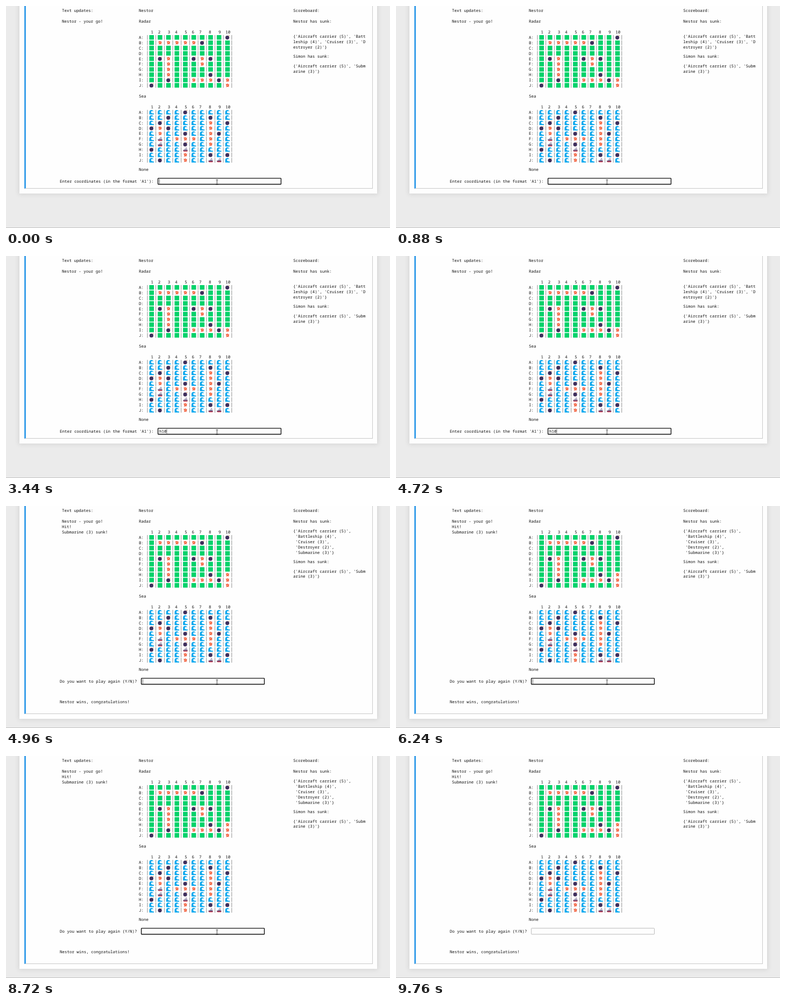
Animation, 714 px wide and 412 px high, one loop 9.84 s. Source, as an HTML page:

```html
<!DOCTYPE html>
<html lang="en">
<head>
<meta charset="utf-8">
<title>Battleships</title>
<style>
html, body { margin: 0; width: 100%; height: 100%; overflow: hidden; background: #ebebeb; }
#stage { position: relative; width: 714px; height: 412px; overflow: hidden; background: #ebebeb; }
#page, #cell { position: absolute; box-sizing: border-box; }
#page { left: 25px; top: -20px; width: 665px; height: 368px; background: #fefefe; box-shadow: 0 0 8px 1px rgba(87, 87, 87, .17); }
#cell { left: 34px; top: -20px; width: 648px; height: 359px; border: 1px solid #cacaca; border-left: 3px solid #3a9fea; }
svg { position: absolute; left: 0; top: 0; }
text { font: 7.483px "Noto Sans Mono", monospace; fill: #111; white-space: pre; text-rendering: geometricPrecision; }
</style>
</head>
<body>
<div id="stage">
  <div id="page"></div>
  <div id="cell"></div>
  <svg width="714" height="412" viewBox="0 0 714 412">
    <defs>
      <rect id="tile" x="-4.3" y="-4.2" width="8.6" height="8.4" rx=".5" fill="#00d26a"/>
      <path id="wave" fill="#0aa8ee" d="M4.3 4.2H-4.2V-.2C-4.2-2.8-2.4-4.2-.2-4.2C1.6-4.2 3-3.2 3.2-1.6C2-2.4 .1-2.5-.7-1.1C-1.6 .7 .2 2.9 4.3 2.2Z"/>
      <g id="bomb">
        <path d="M1.6-2Q2.4-3.5 3.1-3.2" fill="none" stroke="#9b6b4f" stroke-width=".7"/>
        <circle cx="-.3" cy=".4" r="3.6" fill="#3f2f5c"/>
        <circle cx="3.2" cy="-3.3" r=".7" fill="#f9a04a"/>
      </g>
      <g id="boom" transform="scale(.84)">
        <path fill="#f0401f" d="M-3.8-3.9L-1.2-2.4L.6-4.4L1.1-2.2L4.2-2.6L2.4-.4L4.2 1.2L2 1.6L2.6 4.2L.2 2.4L-2.6 4.3L-2-.1L-4.2-.4L-2.4-1.4Z"/>
        <path fill="#ffd3a3" d="M-1.2-1.3L.3-1.6L1.4-.5L.9 1L-.4 1.2L-1 .4Z"/>
      </g>
      <g id="ship">
        <path fill="#c5bdcf" d="M-2.6 .8V-.6H-1.2V-2.2H.6V-3.6H2.6V-2.2H3.6V.8Z"/>
        <path fill="#7d6f92" d="M-1.6-.2H3V.5H-1.6ZM1-3.6H2.4V-2.6H1Z"/>
        <path fill="#5b4470" d="M-4.3 .8H4.3L4 2.8H-3.6Z"/>
        <path fill="#d8475a" d="M-3.8 2.4H4.1L3.7 3.9H-3Z"/>
      </g>
    </defs>
    <rect y="411" width="714" height="1" fill="#c2c2c2"/>
    <g id="common"></g>
    <g id="turn"></g>
    <g id="won"></g>
    <rect id="box" x="282.6" y="319.6" width="228.8" height="11.2" rx=".8" fill="#fefefe" stroke="#111" stroke-width="1.4"/>
    <g id="typed"></g>
    <rect id="caret" x="285" y="321" width=".7" height="8.6" fill="#333"/>
    <path id="mouse" d="M390.3 322.4H391.6L392.3 323L393 322.4H394.3M392.3 323V331M390.3 331.6H391.6L392.3 331L393 331.6H394.3" fill="none" stroke="#222" stroke-width=".9"/>
  </svg>
</div>
<script>
const LOOP = 9840, WIN = 4840, BLUR = 8960, KEYS = [2720, 3040, 3280];
const CHAR = 4.49, BLINK = 530;
const $ = id => document.getElementById(id);

function add(parent, tag, attrs, text) {
  const el = document.createElementNS('http://www.w3.org/2000/svg', tag);
  for (const k in attrs) el.setAttribute(k, attrs[k]);
  if (text) el.textContent = text;
  return parent.appendChild(el);
}

// y is the middle of the first line
function write(parent, x, y, ...lines) {
  lines.forEach((s, i) => add(parent, 'text', { x, y: y + 2.7 + i * 9.9 }, s));
}

const ICONS = { '.': 'tile', '~': 'wave', o: 'bomb', x: 'boom', s: 'ship' };
const cellX = c => 270.7 + c * 15.68;

function icon(parent, kind, x, y) {
  add(parent, 'use', { href: '#' + ICONS[kind], x, y });
}

function board(top, rows) {
  const g = $('common');
  write(g, 247, top, '     1  2   3  4   5  6  7   8   9  10');
  rows.split(' ').forEach((row, r) => {
    const y = top + 9.9 * (r + 1);
    write(g, 247, y, 'ABCDEFGHIJ'[r] + ':');
    [...row].forEach((kind, c) => icon(g, kind, cellX(c), y));
    for (let c = 0; c <= 10; c++)
      add(g, 'rect', { x: cellX(c) - 8.1, y: y - 4.3, width: .8, height: 8.8, fill: '#777' });
  });
}

// Hard changes: steps is a list of [ms, value], the first at 0
function play(el, prop, steps) {
  const frames = steps.map(([ms, v]) => ({ offset: ms / LOOP, [prop]: v, easing: 'step-end' }));
  frames.push({ offset: 1, [prop]: steps[steps.length - 1][1] });
  el.animate(frames, { duration: LOOP, iterations: Infinity });
}

const common = $('common'), turn = $('turn'), won = $('won');

write(common, 104, 8.5, 'Text updates:');
write(common, 104, 28.3, 'Nestor - your go!');
write(common, 247, 8.5, 'Nestor');
write(common, 247, 28.3, 'Radar');
write(common, 247, 167.3, 'Sea');
write(common, 247, 303.7, 'None');
write(common, 534, 8.5, 'Scoreboard:');
write(common, 534, 28.3, 'Nestor has sunk:');

board(48.3, '.........o .xxxxxo... .......... .......... .ox..oxo.. ..x...x... ..x....... ..x....o.. ..o..xxxox o........x');
board(187.2, '~~~~o~~~~~ ~~o~~~~o~~ ~o~~~~~x~o oxo~~~~x~~ ~x~~o~~xo~ ~s~xxx~x~~ ~s~~o~~x~~ o~~~s~~~~~ ~~~~x~~o~o ~o~~x~~ss~');

const rival = ["{'Aircraft carrier (5)', 'Subm", "arine (3)'}"];
write(turn, 534, 56, "{'Aircraft carrier (5)', 'Batt", "leship (4)', 'Cruiser (3)', 'D", "estroyer (2)'}");
write(turn, 534, 93.3, 'Simon has sunk:');
write(turn, 534, 110.9, ...rival);
write(turn, 100, 325.3, "Enter coordinates (in the format 'A1'):");

write(won, 104, 38.2, 'Hit!', 'Submarine (3) sunk!');
write(won, 534, 46.2, "{'Aircraft carrier (5)',", " 'Battleship (4)',", " 'Cruiser (3)',", " 'Destroyer (2)',", " 'Submarine (3)'}");
write(won, 534, 103.2, 'Simon has sunk:');
write(won, 534, 120.8, ...rival);
write(won, 100, 325.3, 'Do you want to play again (Y/N)?');
write(won, 100, 363.7, 'Nestor wins, congratulations!');
const hitY = 48.3 + 9.9 * 8;
add(won, 'rect', { x: cellX(9) - 5, y: hitY - 4.8, width: 10, height: 9.6, fill: '#fefefe' });
icon(won, 'x', cellX(9), hitY);

play(turn, 'opacity', [[0, 1], [WIN, 0]]);
play(won, 'opacity', [[0, 0], [WIN, 1]]);
play($('page'), 'height', [[0, '368px'], [WIN, '415px']]);
play($('cell'), 'height', [[0, '359px'], [WIN, '406px']]);

const box = $('box');
play(box, 'transform', [[0, 'none'], [WIN, 'translateX(-31px)']]);
play(box, 'stroke', [[0, '#111'], [BLUR, '#a8a8a8']]);
play(box, 'strokeWidth', [[0, '1.4px'], [BLUR, '.8px']]);
play($('mouse'), 'opacity', [[0, 1], [BLUR, 0]]);

[...'h10'].forEach((ch, i) => {
  write($('typed'), 285 + i * CHAR, 325.3, ch);
  play($('typed').lastChild, 'opacity', [[0, 0], [KEYS[i], 1], [WIN, 0]]);
});

// The caret blinks, restarting after each key and with each new prompt
function blink(from, to) {
  const out = [];
  for (let t = from, on = 1; t < to; t += BLINK, on = 1 - on) out.push([t, on]);
  return out;
}
play($('caret'), 'opacity', [
  ...blink(0, KEYS[0]), [KEYS[0], 1], ...blink(KEYS[2], WIN), ...blink(WIN, BLUR), [BLUR, 0]
]);
play($('caret'), 'transform', [
  [0, 'none'],
  ...KEYS.map((t, i) => [t, `translateX(${(i + 1) * CHAR}px)`]),
  [WIN, 'translateX(-31px)']
]);
</script>
</body>
</html>
```
